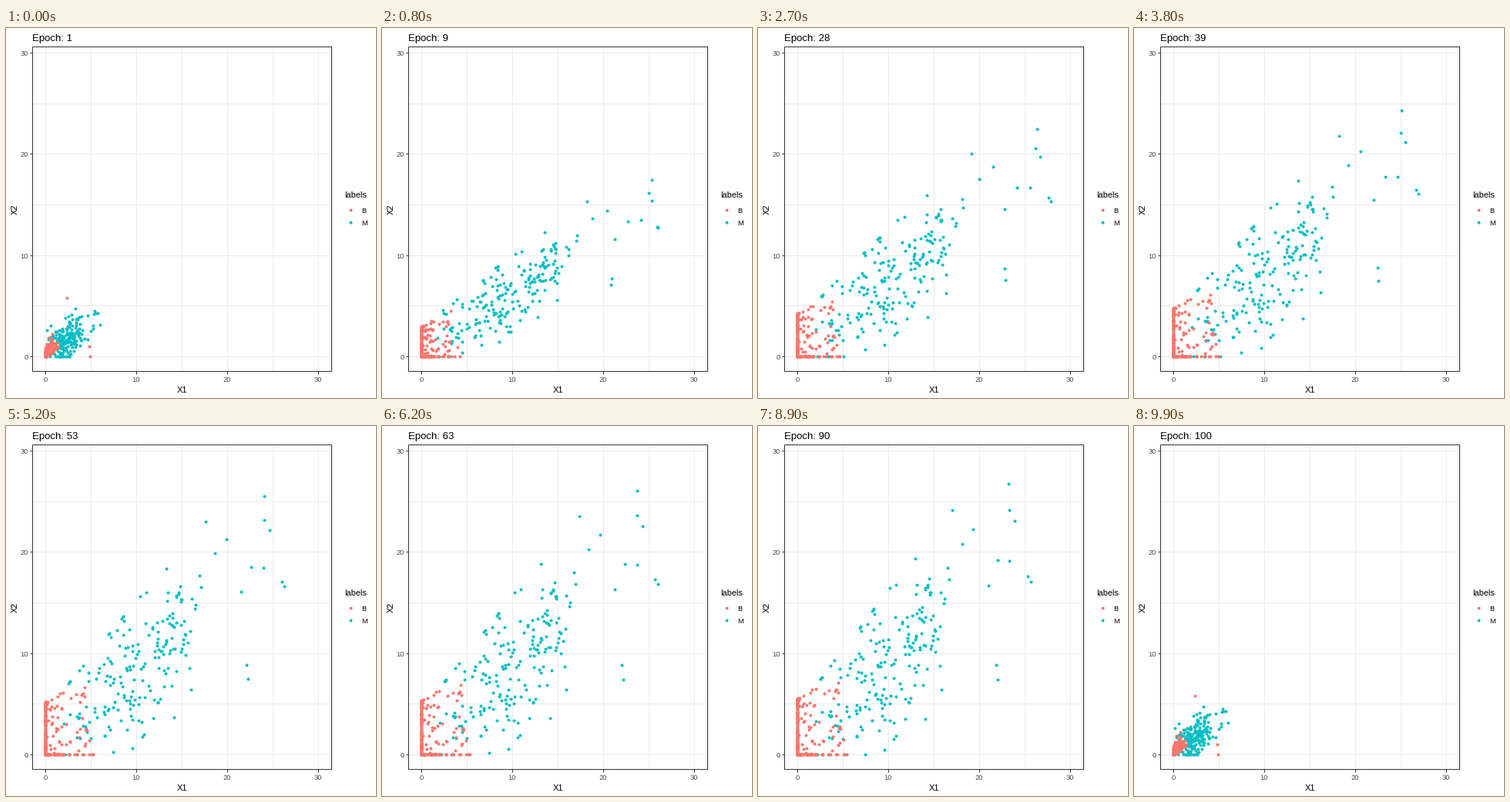
Write a matplotlib script that moves like this. It is 480 px wide and 480 px high and loops after 10 s.

```python
import numpy as np
import matplotlib.pyplot as plt
from matplotlib.animation import FuncAnimation
from matplotlib.patches import Rectangle

plt.rcParams["font.family"] = "Liberation Sans"

SIZE, DPI = 480, 96
PX = 72 / DPI
FRAMES, INTERVAL = 100, 100
RED, TEAL = "#F8766D", "#00BFC4"
GRID, EDGE, GREY = "#EBEBEB", "#333333", "#4D4D4D"
LEFT, RIGHT, TOP, BOTTOM = 34, 422, 24, 445

# Where the most extreme malignant points settle
FAR = [(23, 27), (23.1, 24.4), (23.7, 23.3), (19.2, 22.5), (18, 21),
       (25.5, 17.2), (25.2, 17.7), (23.2, 19.3), (21.9, 19.4),
       (20.9, 16.8), (21.8, 8.9), (22, 7.4)]


def to_px(x, y):
    return 51 + 11.8 * x, 426.3 - 13.13 * y


def malignant(rng, n=192):
    """Starting and settled coordinates of the malignant cloud."""
    x = 17.5 * rng.beta(2.5, 1.9, n)
    y = 9 + 0.75 * (x - 10) + rng.normal(0, 4, n)
    y = np.minimum(y, 4.5 + 1.2 * x)
    x, y = np.concatenate([np.column_stack([x, y]), FAR]).T
    x0 = 0.23 * x + rng.normal(0, 0.4, x.size)
    y0 = 0.1 * x + 0.07 * y + rng.normal(0, 0.9, x.size)
    return x0, y0, x, y


def benign(rng, n_vert=130, n_horiz=90, n_mid=62):
    """Most benign points end up flattened against one of the axes."""
    off = rng.uniform(-2, 0.03, n_vert + n_horiz)
    x = np.concatenate([off[:n_vert], 5.6 * rng.random(n_horiz) ** 4,
                        5 * rng.random(n_mid) ** 1.4])
    y = np.concatenate([5.7 * rng.random(n_vert) ** 1.6, off[n_vert:],
                        7.4 * rng.random(n_mid) ** 1.4])
    x0 = 0.5 * np.abs(rng.normal(0, 1, x.size))
    y0 = 0.7 * x0 + 0.5 * np.abs(rng.normal(0, 1, x.size)) - 0.1
    # the last points are strays that begin far from the rest
    x[-3:], y[-3:] = (4.5, 5.1, 5.5), (7.2, 1.5, 0)
    x0[-3:], y0[-3:] = (2.4, 4.8, 4.9), (5.8, 1, 0)
    return x0, y0, x, y


def tilt_malignant(x, y, r):
    return x + 0.009 * r * x * y, y * (1 - 0.4 * r) + 0.15 * r * x


def tilt_benign(x, y, r):
    return x * (1 - 0.25 * r), y * (1 - 0.4 * r)


def position(cloud, tilt, t):
    """Fast growth out of the start cloud, then a slow turn upwards."""
    x0, y0, x, y = cloud
    grow = 1 - np.exp(-t / 4.1)
    r = min(1, np.exp((16 - t) / 22))
    x1, y1 = tilt(x, y, r)
    return (np.maximum(x0 + (x1 - x0) * grow, 0),
            np.maximum(y0 + (y1 - y0) * grow, 0))


fig = plt.figure(figsize=(SIZE / DPI, SIZE / DPI), dpi=DPI, facecolor="white")
ax = fig.add_axes([0, 0, 1, 1])
ax.set_xlim(0, SIZE)
ax.set_ylim(SIZE, 0)
ax.axis("off")


def line(xs, ys, color, z):
    ax.plot(xs, ys, color=color, lw=PX, zorder=z, solid_capstyle="butt")


def label(x, y, s, size, color="black", ha="left", **kw):
    kw.setdefault("va", "baseline")
    return ax.text(x, y, s, fontsize=size * PX, color=color, ha=ha, **kw)


def dots(color, z, xs=(), ys=()):
    return ax.plot(xs, ys, "o", color=color, ms=4 * PX, mew=0, zorder=z,
                   antialiased=False)[0]


for v in range(0, 31, 5):
    gx, gy = np.floor(to_px(v, v))
    line([gx, gx], [TOP, BOTTOM], GRID, 1)
    line([LEFT, RIGHT], [gy, gy], GRID, 1)
    if v % 10 == 0:
        line([gx, gx], [BOTTOM, BOTTOM + 4], EDGE, 5)
        line([LEFT - 3, LEFT], [gy, gy], EDGE, 5)
        label(gx, 459, str(v), 9.3, GREY, "center")
        label(29, gy + 4, str(v), 9.3, GREY, "right")

ax.add_patch(Rectangle((LEFT, TOP), RIGHT - LEFT, BOTTOM - TOP, fill=False,
                       ec=EDGE, lw=PX, zorder=5))
title = label(34, 17, "", 13.3)
label(228, 473, "X1", 11, ha="center")
label(11.5, 235.5, "X2", 11, ha="center", va="center", rotation=90)
label(439, 220, "labels", 11)
for name, color, y in (("B", RED, 236), ("M", TEAL, 252)):
    dots(color, 3, [447], [y])
    label(461.5, y + 4.5, name, 9.3)

rng = np.random.default_rng(7)
groups = [(dots(TEAL, 3), malignant(rng), tilt_malignant),
          (dots(RED, 4), benign(rng), tilt_benign)]


def update(i):
    title.set_text(f"Epoch: {i + 1}")
    t = i % (FRAMES - 1)  # the last epoch snaps back to the starting cloud
    for art, cloud, tilt in groups:
        art.set_data(*to_px(*position(cloud, tilt, t)))
    return [title] + [g[0] for g in groups]


anim = FuncAnimation(fig, update, frames=FRAMES, interval=INTERVAL,
                     repeat=True, repeat_delay=0)
plt.show()
```
